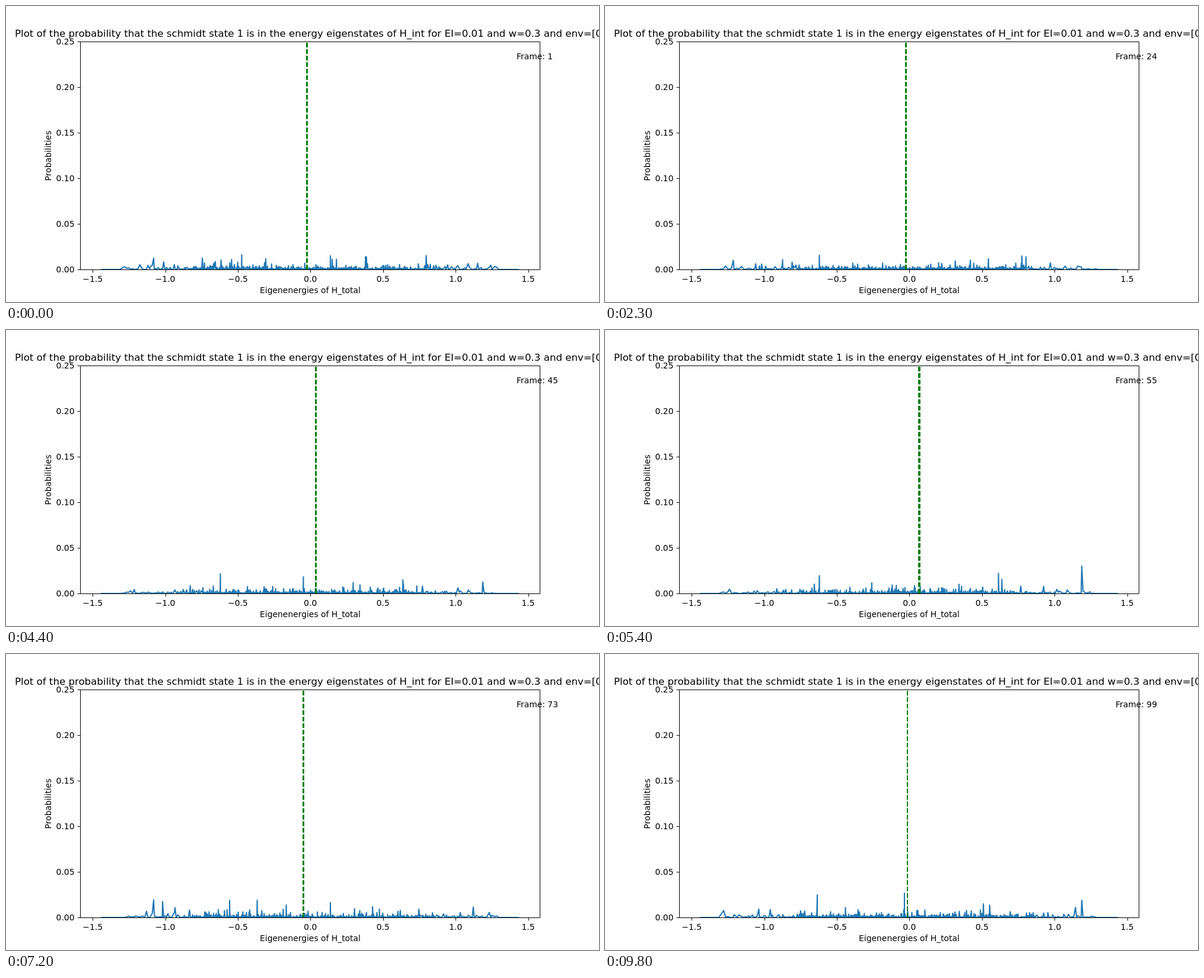
Write an HTML page that moves like this. It is 1000 px wide and 500 px high and loops after 9.9 s.

```html
<!DOCTYPE html>
<html lang="en">
<head>
<meta charset="utf-8">
<title>Energy eigenstate probabilities</title>
<style>
  html, body { margin: 0; width: 100%; height: 100%; overflow: hidden; background: #fefefe; }
  svg { display: block; width: 1000px; height: 500px; }
  text { font: 13.89px "DejaVu Sans", sans-serif; fill: #000; white-space: pre; }
  .title { font-size: 16.62px; }
  .axis { fill: none; stroke: #000; stroke-width: 1; }
  .curve { fill: none; stroke: #1f77b4; stroke-width: 2.08; stroke-linejoin: round; }
  .mark { stroke-width: 2; stroke-dasharray: 7.71 3.33; }
</style>
</head>
<body>
<svg viewBox="0 0 1000 500">
  <defs><clipPath id="box"><rect x="125" y="60" width="776" height="385.5"/></clipPath></defs>
  <g id="plot" clip-path="url(#box)"></g>
  <g id="axes"></g>
  <text class="title" x="15" y="52">Plot of the probability that the schmidt state 1 is in the energy eigenstates of H_int for EI=0.01 and w=0.3 and env=[0]</text>
  <text x="513" y="485" text-anchor="middle">Eigenenergies of H_total</text>
  <text transform="translate(76 253) rotate(-90)" text-anchor="middle">Probabilities</text>
  <text id="count" x="861" y="90"></text>
</svg>
<script>
const STEP = 100, STEPS = 99, BASE = 445, ZERO = 513.4;

// key poses: step, mean energy (px), tallest peaks as [x, height]
const keys = [
  { n: 0, x: 507.5, tall: [[249, 19], [397.5, 25], [547, 23]] },
  { n: 13, x: 501.5, tall: [[254, 29], [299.5, 44], [710, 36]] },
  { n: 33, x: 513.2, tall: [[361.5, 27], [501.5, 29], [703, 23]] },
  { n: 54, x: 530, tall: [[361.5, 30], [663.5, 34], [804, 46]] },
  { n: 72, x: 501.5, tall: [[264, 27], [377, 29], [547, 25]] },
  { n: 84, x: 532.5, tall: [[254, 29], [671, 32], [789.5, 33]] },
  { n: 98, x: 510, tall: [[358, 38], [505, 41], [804, 29]] }
];

function rand(i, k) {
  let h = Math.imul(i + 1, 374761393) ^ Math.imul(k + 7, 668265263);
  h = Math.imul(h ^ (h >>> 13), 1274126177);
  h = Math.imul(h ^ (h >>> 15), 2246822519);
  return ((h ^ (h >>> 16)) >>> 0) / 4294967296;
}

const offset = x => Math.abs(x - ZERO) / 260;

// the spectrum is dense in the middle and thins out to both ends
function makeLevels() {
  const set = new Set([160, 192, 831, 865]);
  for (const key of keys) key.tall.forEach(p => set.add(p[0]));
  for (let x = 200, i = 0; x < 829; i++) {
    set.add(x);
    x += (0.4 + 1.7 * offset(x) ** 4) * (0.4 + 1.2 * rand(i, 90));
  }
  return [...set].sort((a, b) => a - b);
}

const levels = makeLevels();

const spectra = keys.map((key, k) => {
  const tall = new Map(key.tall);
  return levels.map((x, i) => {
    if (x <= 192 || x >= 831) return 0;
    const r = -Math.log(1 - rand(i, k));
    return tall.get(x) ?? 0.85 * (1 + 0.6 * offset(x)) * r ** 1.6;
  });
});

const $ = id => document.getElementById(id);
function add(parent, tag, attrs, text) {
  const el = document.createElementNS("http://www.w3.org/2000/svg", tag);
  for (const name in attrs) el.setAttribute(name, attrs[name]);
  if (text) el.textContent = text;
  return parent.appendChild(el);
}

function drawAxes() {
  let d = "M125.5 60.5H900.5V445.5H125.5Z";
  for (let i = -3; i <= 3; i++) {
    const x = ZERO + i * 122.4;
    d += `M${Math.round(x) + 0.5} 445.5v4.9`;
    add($("axes"), "text", { x, y: 466, "text-anchor": "middle" },
      (i < 0 ? "\u2212" : "") + Math.abs(i / 2).toFixed(1));
  }
  for (let i = 0; i <= 5; i++) {
    const y = BASE - i * 77;
    d += `M125.5 ${y + 0.5}h-4.9`;
    add($("axes"), "text", { x: 115.5, y: y + 5, "text-anchor": "end" }, (i * 0.05).toFixed(2));
  }
  add($("axes"), "path", { class: "axis", d });
}

const curve = add($("plot"), "path", { class: "curve" });
const marks = ["#0000ff", "#008000", "#008000"].map(stroke =>
  add($("plot"), "line", { class: "mark", stroke, y1: BASE, y2: 60 }));

function draw(n) {
  let k = 0;
  while (k < keys.length - 2 && n >= keys[k + 1].n) k++;
  const a = keys[k], b = keys[k + 1];
  const u = (n - a.n) / (b.n - a.n);
  const wild = 4 * u * (1 - u);

  const pts = levels.map((x, i) => {
    const h = spectra[k][i] * (1 - u) + spectra[k + 1][i] * u;
    const jitter = 1 - wild + wild * 2 * rand(i, 200 + n);
    return x.toFixed(2) + " " + (BASE - h * jitter).toFixed(2);
  });
  curve.setAttribute("d", "M" + pts.join("L"));

  // the green pair spreads with the distance from zero; all lines snap to pixels
  const x = a.x + (b.x - a.x) * (1 - Math.cos(Math.PI * u)) / 2;
  const gap = 0.07 * (x - ZERO);
  [0, -gap, gap].forEach((off, i) => {
    const px = Math.round(x + off);
    marks[i].setAttribute("x1", px);
    marks[i].setAttribute("x2", px);
  });
  $("count").textContent = "Frame: " + (n + 1);
}

drawAxes();
const start = performance.now();
let shown = -1;
function tick() {
  const n = Math.floor(Math.max(0, performance.now() - start) / STEP) % STEPS;
  if (n !== shown) draw(shown = n);
  requestAnimationFrame(tick);
}
tick();
</script>
</body>
</html>
```
